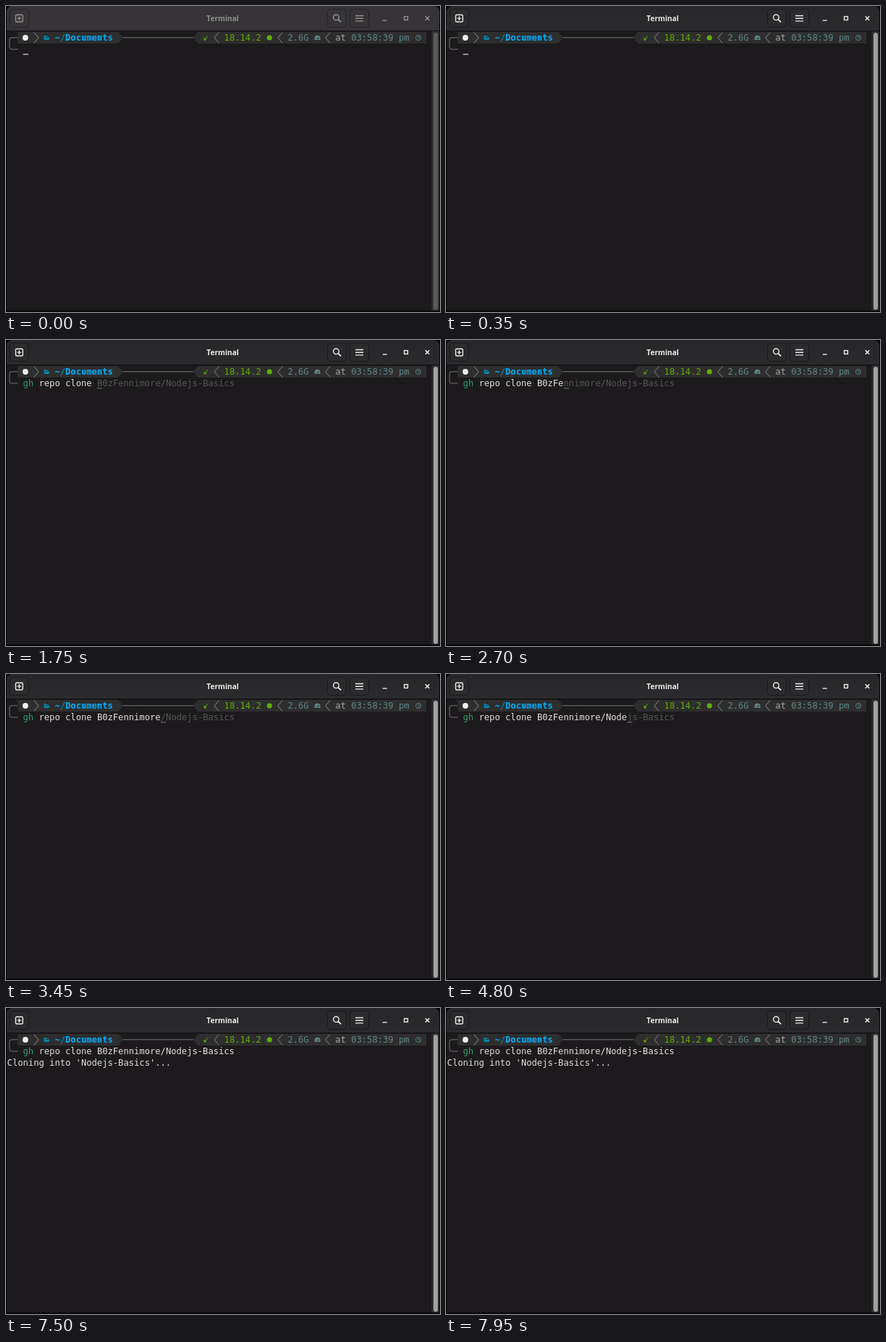
Recreate the animation shown at these times as an HTML page. Size 600 by 424 pixels, loop 8000 ms.

```html
<!DOCTYPE html>
<html lang="en">
<head>
<meta charset="utf-8">
<title>Terminal</title>
<style>
  html, body { margin: 0; width: 100%; height: 100%; overflow: hidden; background: #060606; }
  svg { display: block; width: 600px; height: 424px; --focus: 0%; }
  text { white-space: pre; }
  .term text { font: 12.154px "DejaVu Sans Mono", "Noto Sans Mono", monospace; }
  .title { font: 700 10.1px "Open Sans", "Noto Sans", sans-serif; text-anchor: middle; }
  .ink { fill: color-mix(in srgb, #eeeeec var(--focus), #929190); }
  .pen { fill: none; stroke: color-mix(in srgb, #eeeeec var(--focus), #929190); stroke-width: 1.4; }
  .top { stop-color: color-mix(in srgb, #272628 var(--focus), #363437); }
  .low { stop-color: color-mix(in srgb, #2b2a2c var(--focus), #363437); }
  .btn { fill: color-mix(in srgb, #2b2a2c var(--focus), #363437); stroke: color-mix(in srgb, #1a191b var(--focus), #222123); }
  .trough { fill: color-mix(in srgb, #2f2e30 var(--focus), #323133); }
  .slider { fill: color-mix(in srgb, #a3a2a0 var(--focus), #5c5b5a); }
  .seg { fill: #2e2e2e; }
  .sep { fill: none; stroke: #767676; stroke-width: 1.1; }
  .frame { fill: none; stroke: #585858; stroke-width: 1.4; }
  .term .path { font-weight: 700; fill: #00afff; }
  .dim { fill: #585858; }
  .fg { fill: #e2e1de; }
  .ok { fill: #5faf00; }
  .cmd { fill: #2a9d68; }
  .info { fill: #5f8787; }
  .blue { fill: #0087af; }
</style>
</head>
<body>
<svg viewBox="0 0 600 424">
  <defs>
    <linearGradient id="bar" x2="0" y2="1">
      <stop class="top"/>
      <stop class="low" offset="1"/>
    </linearGradient>
  </defs>

  <path d="M1 422V8a8 8 0 0 1 8-8H591a8 8 0 0 1 8 8V422z" fill="#1c1a1c"/>
  <path d="M1 34V8a8 8 0 0 1 8-8H591a8 8 0 0 1 8 8V34z" fill="url(#bar)"/>
  <path d="M1 34.5H599" stroke="#121113"/>

  <g class="btns">
    <rect class="btn" x="5.5" y="4.5" width="26" height="25" rx="4"/>
    <rect class="btn" x="444.5" y="4.5" width="26" height="25" rx="4"/>
    <rect class="btn" x="475.5" y="4.5" width="26" height="25" rx="4"/>
  </g>
  <g class="pen">
    <rect x="13.4" y="12.2" width="9.8" height="9.8" rx="1.5"/>
    <path d="M15.5 17.1H21.1M18.3 14.3V19.9"/>
    <circle cx="456.4" cy="15.8" r="3.8"/>
    <path d="M459.2 18.6L463 22.4" stroke-width="1.9"/>
    <path d="M483 13.5H494M483 17.2H494M483 20.9H494"/>
    <path d="M520.8 20H526.6"/>
    <rect x="550.6" y="14.6" width="4.8" height="4.8"/>
    <path d="M579.8 14.3L585.2 19.7M585.2 14.3L579.8 19.7" stroke-width="1.6"/>
  </g>
  <text class="title ink" x="299.6" y="20.6">Terminal</text>

  <rect class="trough" x="588" y="35" width="11" height="387"/>
  <path d="M588 35V422" stroke="#1b1a1c"/>
  <rect class="slider" x="591" y="37" width="6" height="384" rx="3"/>

  <g class="term">
    <path class="frame" d="M16.2 43.8H8.5Q4.8 43.8 4.8 47.5V56.3Q4.8 60 8.5 60H16.2M161 43.8H259"/>
    <path class="seg" d="M16.2 36H155L162 44L155 52H16.2zM581 36H265.5L258.5 44L265.5 52H581z"/>
    <path class="sep" d="M38.5 36.5L45 44L38.5 51.5M294.5 36.5L288 44L294.5 51.5M382.3 36.5L375.8 44L382.3 51.5M448.2 36.5L441.7 44L448.2 51.5"/>

    <circle cx="26.8" cy="44" r="3.9" fill="#eeeeee"/>
    <path class="blue" d="M52.5 41H55.5L56.3 41.9H59V43H54.5V44H60.3L59.3 47H52.5z"/>
    <text class="path" x="67.4" y="48">~<tspan class="blue">/</tspan>Documents</text>

    <path class="ok" d="M272.8 44.6L274.2 43.9L275.3 45.5Q276.9 42 279.8 40.1Q277.2 43.6 275.8 47.9H274.7z"/>
    <text class="ok" x="301.6" y="48">18.14.2</text>
    <circle class="ok" cx="364.2" cy="44" r="3.6"/>
    <text class="info" x="389.4" y="48">2.6G</text>
    <path class="info" d="M426.5 47V45a4 4.2 0 0 1 8 0V47z"/>
    <path d="M428 44.8H429M430.5 46.6L432 42.8M432.4 44.8H433.2" stroke="#303030"/>
    <text x="455.3" y="48" fill="#a8a8a8">at</text>
    <text class="info" x="477.2" y="48">03:58:39 pm</text>
    <g fill="none" stroke="#5f8787">
      <circle cx="570" cy="44" r="3.5"/>
      <path d="M570 42V44.3H571.6"/>
    </g>

    <text id="cmd" class="cmd" y="64"></text>
    <text id="typed" class="fg" y="64"></text>
    <text id="hint" class="dim" y="64"></text>
    <text id="out" class="fg" x="1.6" y="80.3">Cloning into 'Nodejs-Basics'...</text>
    <rect id="cursor" width="7.3" height="1.2"/>
  </g>
</svg>
<script>
  const LOOP = 8000, CELL = 7.317, ENTER = 6950, REPLY = 7500;
  const LINE = "gh repo clone B0zFennimore/Nodejs-Basics";
  // time at which each character of LINE is typed
  const KEYS = [
    550, 650, 750, 850, 950, 1050, 1150, 1200, 1300, 1350,
    1500, 1600, 1650, 1750, 1950, 2150, 2250, 2500, 2700, 2850,
    3000, 3050, 3200, 3300, 3350, 3450, 4100, 4450, 4650, 4800,
    4800, 4950, 5000, 5350, 5750, 6050, 6150, 6300, 6450, 6500
  ];

  const $ = id => document.getElementById(id);
  const svg = document.querySelector("svg");
  const colX = col => 1.6 + col * CELL;

  function put(id, start, end) {
    const el = $(id);
    el.setAttribute("x", colX(3 + start));
    el.textContent = LINE.slice(start, end);
  }

  function render(t) {
    const p = Math.min(1, Math.max(0, (t - 200) / 200));
    const focus = 1 - (1 - p) ** 2;
    svg.style.setProperty("--focus", (t < 250 ? 0 : focus * 100) + "%");

    const n = KEYS.filter(k => k <= t).length;
    put("cmd", 0, Math.min(n, 2));
    put("typed", Math.min(n, 2), n);
    put("hint", n, n ? LINE.length : 0);

    const entered = t >= ENTER, replied = t >= REPLY;
    const overHint = n > 0 && n < LINE.length;
    const cursor = $("cursor");
    cursor.setAttribute("x", colX(entered ? 0 : 3 + n));
    cursor.setAttribute("y", entered ? 82.4 : 66.3);
    cursor.setAttribute("fill", overHint ? "#6a6a6a" : "#e2e1de");
    cursor.style.display = replied ? "none" : "";
    $("out").style.display = replied ? "" : "none";
  }

  const start = performance.now();
  function tick() {
    render((performance.now() - start) % LOOP);
    requestAnimationFrame(tick);
  }
  tick();
</script>
</body>
</html>
```
